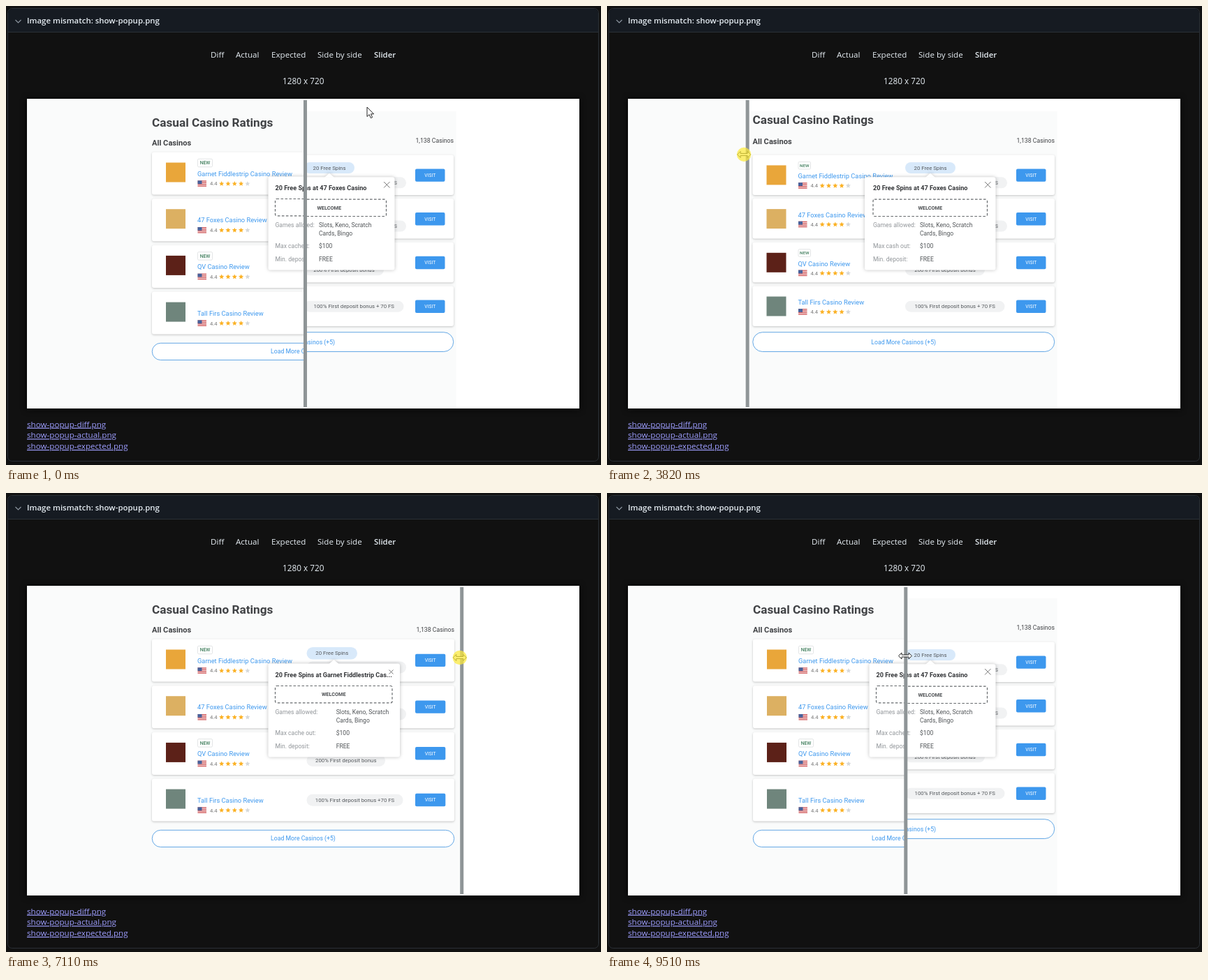
Write an HTML page that moves like this. It is 852 px wide and 658 px high and loops after 9910 ms.

```html
<!DOCTYPE html>
<html lang="en">
<head>
<meta charset="utf-8">
<title>Image mismatch slider</title>
<style>
html, body { margin: 0; width: 100%; height: 100%; overflow: hidden; background: #111; }
svg { display: block; width: 852px; height: 658px; font-family: Roboto, sans-serif; }
.ui { font-family: "Open Sans", "Noto Sans", sans-serif; }
.shade { filter: drop-shadow(0 1px 5px #000); }
.card { fill: #fff; filter: drop-shadow(0 1px 1.5px rgba(0, 0, 0, .22)); }
.popup { fill: #fff; filter: drop-shadow(0 0 2.5px rgba(0, 0, 0, .25)); }
</style>
</head>
<body>
<svg id="stage" viewBox="0 0 852 658"></svg>
<script>
const BLUE = '#3d98ee', INK = '#404245';

const text = (x, cy, s, size, fill = INK, extra = '') =>
  `<text x="${x}" y="${cy + size * .355}" font-size="${size}" fill="${fill}" ${extra}>${s}</text>`;
const box = (x, y, w, h, r, extra) =>
  `<rect x="${x}" y="${y}" width="${w}" height="${h}" rx="${r}" ${extra}/>`;
const MID = 'text-anchor="middle"', BOLD = 'font-weight="700"', MEDIUM = 'font-weight="500"';

function star(cx, cy, fill) {
  const points = [...Array(10).keys()].map(i => {
    const a = i * Math.PI / 5, r = i % 2 ? 1.7 : 3.8;
    return `${(cx + r * Math.sin(a)).toFixed(2)},${(cy - r * Math.cos(a)).toFixed(2)}`;
  });
  return `<polygon points="${points.join(' ')}" fill="${fill}"/>`;
}

function flag(x, y) {
  const stripes = [0, 1, 2, 3].map(i => box(x, y + i * 2.4, 12.5, 1.3, 0, 'fill="#d4585a"')).join('');
  return box(x, y, 12.5, 8.6, 0, 'fill="#f3e9e9"') + stripes + box(x, y, 6, 4.8, 0, 'fill="#47629b"');
}

const pill = (x, right, cy, h, label, fill = '#f1f2f3') =>
  box(x, cy - h / 2, right - x, h, h / 2, `fill="${fill}"`) +
  text((x + right) / 2, cy, label, 7.8, '#55595d', MID);

const casinos = [
  { name: 'Garnet Fiddlestrip', color: '#e9a63a', isNew: true },
  { name: '47 Foxes', color: '#dcb062' },
  { name: 'QV Casino', color: '#5c2118', isNew: true },
  { name: 'Tall Firs Casino', color: '#6f857c' }
];

function card(c, i, p) {
  const y = p.top + i * p.pitch, up = c.isNew ? 0 : p.lift, x = p.x;
  const title = c.name.replace(/ Casino$/, '') + ' Casino Review';
  const [bw, bh] = p.badge, row = y + p.rowY - up;
  return box(x, y, p.right - x, p.h, 3, 'class="card"') +
    box(x + 20, y + 15, 28, 28, 0, `fill="${c.color}"`) +
    (c.isNew ? box(x + 65.5, y + p.badgeY - bh / 2, bw, bh, 1.5, 'fill="#fff" stroke="#dcdfe0" stroke-width=".8"') +
      text(x + 65.5 + bw / 2, y + p.badgeY, 'NEW', p.badgeSize, '#3f7d5c', `${MID} ${MEDIUM}`) : '') +
    text(x + 65, y + p.titleY - up, title, 9.3, BLUE) +
    flag(x + 65.5, row - 4.5) + text(x + 83, row, '4.4', 7.6, '#777') +
    [0, 1, 2, 3, 4].map(k => star(x + 99.7 + k * 9.3, row, k < 4 ? '#fbb124' : '#d5d8da')).join('') +
    box(586, y + p.visitY - 9.2, p.visitW, 18.4, 2, `fill="${BLUE}"`) +
    text(586 + p.visitW / 2, y + p.visitY, 'VISIT', 6.7, '#fff', MID);
}

function popup(p) {
  const { left, right, top, notch, pad, value, cross } = p.popup, mid = (pad + p.popup.inner) / 2;
  const [cx, cy, r] = cross;
  const rows = [['Games allowed:', 'Slots, Keno, Scratch', 313.5], ['', 'Cards, Bingo', 325.5],
    [p.cash, '$100', 344], ['Min. deposit:', 'FREE', 363]];
  return `<g class="popup">${box(left, top, right - left, 378.5 - top, 3, '')}
      <path d="M${notch - 7} ${top + .5}l7 -6l7 6z"/></g>` +
    text(pad, 260.7, p.offer, 9.1, '#333538', BOLD) +
    `<path d="M${cx - r} ${cy - r}l${2 * r} ${2 * r}m0 ${-2 * r}l${-2 * r} ${2 * r}" stroke="#666" stroke-width=".9"/>` +
    box(pad, top + 32, p.popup.inner - pad, 24.3, 2, 'fill="none" stroke="#666a6d" stroke-width="1.2" stroke-dasharray="3.6 2.4"') +
    text(mid, top + 44.2, 'WELCOME', 7.3, '#4a4d50', `${MID} ${BOLD}`) +
    rows.map(([label, v, y]) => text(pad, y, label, 8.6, '#92969a') + text(value, y, v, 8.6, '#505457')).join('');
}

const page = p =>
  text(p.x, p.headY, 'Casual Casino Ratings', 17.2, INK, BOLD) +
  text(p.x, p.subY, 'All Casinos', 11.1, INK, BOLD) +
  text(p.right, p.countY, '1,138 Casinos', 8.7, INK, 'text-anchor="end"') +
  casinos.map((c, i) => card(c, i, p)).join('') +
  p.pills.map(a => pill(...a)).join('') +
  box(p.x + .3, p.more[0], p.right - p.x - .6, p.more[1], p.more[1] / 2, 'fill="#fff" stroke="#549fe3" stroke-width=".9"') +
  text((p.x + p.right) / 2, p.more[0] + p.more[1] / 2, 'Load More Casinos (+5)', 8.7, BLUE, MID) +
  popup(p);

const actual = {
  x: 209, right: 642, top: 209.5, pitch: 66.7, h: 61, lift: 0, headY: 166.5, subY: 196.5, countY: 195.5,
  badge: [21, 11.5], badgeY: 15.5, badgeSize: 6.8, titleY: 30.7, rowY: 45.3, visitW: 43.3, visitY: 30.4,
  pills: [[430.5, 503, 229.7, 17.5, '20 Free Spins', '#d8e9fa'],
    [430.5, 573, 250, 17, '100% First deposit bonus + 100 FS'],
    [430.5, 573, 317, 17, '100% First deposit bonus + 100 FS'],
    [430.5, 543, 383.5, 17, '200% First deposit bonus'],
    [430.5, 568.5, 440.2, 17, '100% First deposit bonus +70 FS']],
  more: [483.3, 24.2], cash: 'Max cache out:', offer: '20 Free Spins at Garnet Fiddlestrip Cas...',
  popup: { left: 375.5, right: 564, top: 244.5, notch: 469.5, pad: 385.5, inner: 553, value: 472.7, cross: [551.5, 256.5, 3] }
};
const expected = {
  x: 208.5, right: 641, top: 213.4, pitch: 62.7, h: 57.5, lift: 7.2, headY: 162.5, subY: 194.5, countY: 193,
  badge: [17.5, 10.5], badgeY: 15.2, badgeSize: 6.2, titleY: 30.6, rowY: 44.3, visitW: 42.5, visitY: 29.2,
  pills: [[427, 499, 232, 16, '20 Free Spins', '#d8e9fa'],
    [427, 573, 253.3, 16, '100% First deposit bonus + 100 FS'],
    [427, 573, 315.5, 16, '100% First deposit bonus + 100 FS'],
    [427, 541, 378.3, 16, '200% First deposit bonus'],
    [427, 569.5, 430.7, 16, '100% First deposit bonus + 70 FS']],
  more: [467.7, 27.8], cash: 'Max cash out:', offer: '20 Free Spins at 47 Foxes Casino',
  popup: { left: 369, right: 556.5, top: 245.2, notch: 463, pad: 381, inner: 544.5, value: 448, cross: [545.3, 256.3, 4.2] }
};

const tabs = [['Diff', 293], ['Actual', 329], ['Expected', 380], ['Side by side', 446]];
const links = ['diff', 'actual', 'expected'];

document.getElementById('stage').innerHTML = `
  <clipPath id="cut"><rect id="cutBox" x="30" y="133" width="398" height="444"/></clipPath>
  <g class="ui">
    ${box(2.5, 3.5, 846, 649, 6, 'fill="#111" stroke="#2b3036"')}
    <path d="M3 37.5V10a6 6 0 0 1 6 -6H842a6 6 0 0 1 6 6V37.5z" fill="#161b22"/>
    <path d="M3 37.5H848" stroke="#2b3036"/>
    <path d="M13.5 20l4 4l4 -4" fill="none" stroke="#8b949e" stroke-width="1.2"/>
    ${text(30, 21.2, 'Image mismatch: show-popup.png', 11.45, '#e6edf3', 'font-weight="600"')}
    ${tabs.map(([s, x]) => text(x, 69.8, s, 11.6, '#e6edf3')).join('')}
    ${text(527, 69.8, 'Slider', 11.4, '#e6edf3', 'font-weight="600"')}
    ${text(425.7, 107.6, '1280 x 720', 11.8, '#e6edf3', MID)}
    ${links.map((s, i) => text(30, 599.5 + i * 15.7, `show-popup-${s}.png`, 11.63, '#9e9eff', 'text-decoration="underline"')).join('')}
  </g>
  ${box(30, 133, 791, 444, 0, 'fill="#fff" class="shade"')}
  ${box(30, 151, 614.5, 426, 0, 'fill="#fafbfb"')}
  ${page(expected)}
  <g clip-path="url(#cut)">${box(30, 133, 791, 444, 0, 'fill="#fafbfb"')}${page(actual)}</g>
  <rect id="handle" y="135" width="5" height="440" fill="#8f9597"/>
  <g fill="#fff" stroke="#111" stroke-width=".9" stroke-linejoin="round">
    <path id="arrow" d="M0 0V13.5L3.2 10.6L5.4 15.6L7.6 14.6L5.5 9.8H9.6z"/>
    <path id="resize" d="M-9.5 0L-5 -4.5V-1.5H5V-4.5L9.5 0L5 4.5V1.5H-5V4.5z"/>
  </g>
  <circle id="glow" r="10.2" fill="#fbe93a"/>`;

const LOOP = 9910;
// Pointer stops: time, x, y.
const stops = [
  [70, 517, 145], [540, 427, 208.5], [1140, 427, 208.5], [1820, 182, 211], [1960, 182, 211],
  [2845, 652, 205], [3050, 654, 205], [3140, 654, 205], [3855, 191, 213], [3960, 190, 213],
  [4100, 190, 213], [4980, 656, 212], [5110, 656, 212], [5824, 183, 219], [6080, 180, 220],
  [6150, 180, 220], [7070, 653, 236], [7860, 179, 232], [8080, 184, 232], [8800, 693, 232], [9230, 427, 233.5]
];

function pointer(t) {
  const i = stops.findIndex(s => s[0] > t);
  if (i < 1) return (i ? stops[stops.length - 1] : stops[0]).slice(1);
  const [t0, x0, y0] = stops[i - 1], [t1, x1, y1] = stops[i];
  const u = (t - t0) / (t1 - t0), e = u * u * (3 - 2 * u);
  return [x0 + (x1 - x0) * e, y0 + (y1 - y0) * e];
}

function snap(t) {
  const step = t < 1200 ? 66.7 : 68.7;
  return 1200 + Math.floor((t - 1200) / step + .2) * step;
}

const el = Object.fromEntries(['cutBox', 'handle', 'arrow', 'resize', 'glow'].map(id => [id, document.getElementById(id)]));
const start = performance.now();

function draw() {
  const now = (performance.now() - start) % LOOP, t = snap(now);
  const [x, y] = pointer(t);
  // The handle trails the pointer a little.
  const grip = t < 1140 ? 428.5 : pointer(t - 16)[0] + .8;
  const over = t > 300 && (t > 540 || x < 437);
  const place = `translate(${x} ${y})`;
  el.cutBox.setAttribute('width', Math.max(0, grip - 30));
  el.handle.setAttribute('x', grip - 2.5);
  for (const k of ['arrow', 'resize', 'glow']) el[k].setAttribute('transform', place);
  el.arrow.setAttribute('opacity', over ? 0 : 1);
  el.resize.setAttribute('opacity', over ? 1 : 0);
  const glow = now < 800 || now >= 9505 ? 0 : Math.min(1, (Math.floor((now - 800) / 67) + 1) / 3);
  el.glow.setAttribute('opacity', glow * .72);
  requestAnimationFrame(draw);
}
draw();
</script>
</body>
</html>
```
